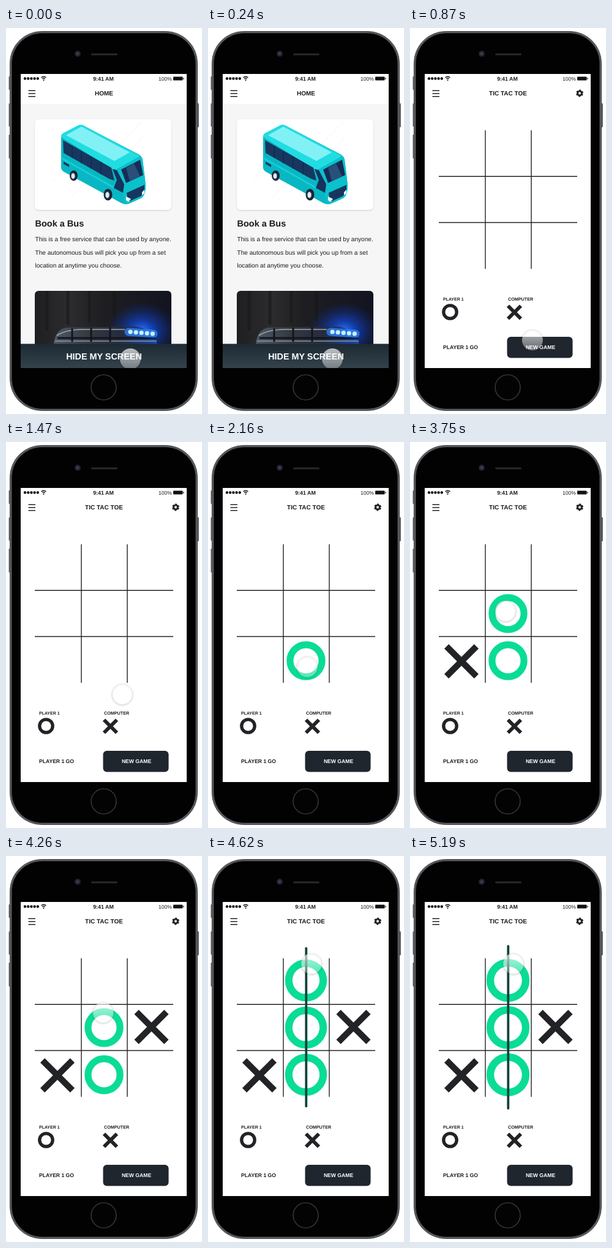
Recreate the animation shown at these times as an HTML page. Size 320 px wide and 630 px high, loop 5.22 s.

```html
<!DOCTYPE html>
<html lang="en">
<head>
<meta charset="utf-8">
<title>Tic tac toe prototype</title>
<style>
html, body { margin: 0; width: 100%; height: 100%; overflow: hidden; background: #fff }
svg { display: block; width: 320px; height: 630px }
text { font-family: "Liberation Sans", Arial, sans-serif; fill: #1c1c1e; text-rendering: geometricPrecision }
.b { font-weight: bold }
.m { text-anchor: middle }
</style>
</head>
<body>
<svg viewBox="0 0 320 630">
  <defs>
    <linearGradient id="bar" x2="0" y2="1"><stop stop-color="#1d2a34"/><stop offset="1" stop-color="#33424b"/></linearGradient>
    <linearGradient id="night" x2="1" y2="0">
      <stop stop-color="#1f1f21"/><stop offset=".25" stop-color="#2c2c2e"/><stop offset=".5" stop-color="#1e1e22"/><stop offset="1" stop-color="#121420"/>
    </linearGradient>
    <linearGradient id="lamp" x2="1" y2="0"><stop stop-color="#4d5967"/><stop offset=".35" stop-color="#34373d"/><stop offset=".65" stop-color="#252c40"/><stop offset="1" stop-color="#1646b0"/></linearGradient>
    <radialGradient id="glow"><stop stop-color="#2a78ff"/><stop offset=".35" stop-color="#1248d8" stop-opacity=".7"/><stop offset="1" stop-color="#0a2a90" stop-opacity="0"/></radialGradient>
    <linearGradient id="touch" x2="0" y2="1"><stop stop-color="#fff" stop-opacity=".7"/><stop offset="1" stop-color="#fff" stop-opacity=".3"/></linearGradient>
    <filter id="soft" x="-30%" y="-30%" width="160%" height="160%"><feGaussianBlur stdDeviation="1.2"/></filter>
    <clipPath id="screen"><path d="M24 75h271v480H24z"/></clipPath>
    <clipPath id="photo"><rect x="47" y="429" width="223" height="110" rx="6"/></clipPath>
    <circle id="ring" r="26.1" fill="none" stroke="#09dc96" stroke-width="11.2"/>
    <path id="cross" d="M-24.400-24.400L24.400 24.400M24.400-24.400L-24.400 24.400" stroke="#222326" stroke-width="10.200"/>
  </defs>

  <!-- Phone -->
  <g fill="#66686d">
    <rect x="4.500" y="79" width="4" height="22" rx="1"/><rect x="4.500" y="123" width="4" height="38" rx="1"/>
    <rect x="4.500" y="174" width="4" height="39" rx="1"/><rect x="311" y="123" width="4" height="39" rx="1"/>
  </g>
  <rect x="6.500" y="5.500" width="306" height="619" rx="52" fill="#5b5d62" stroke="#434549"/>
  <rect x="9.500" y="8.500" width="300" height="613" rx="49" fill="#020203" stroke="#28292c"/>
  <circle cx="117" cy="42" r="5" fill="#22232c"/><circle cx="117" cy="42" r="2.400" fill="#3a3d55"/>
  <rect x="139" y="41.500" width="43" height="3" rx="1.500" fill="#28292c"/>
  <circle cx="159.500" cy="586.500" r="20.500" fill="#030304" stroke="#343539" stroke-width="1.600"/>

  <g clip-path="url(#screen)">
    <path d="M24 75h271v480H24z" fill="#fff"/>

    <g id="game">
      <text class="b m" x="160" y="109.700" font-size="10">TIC TAC TOE</text>
      <g transform="translate(277 106.500) rotate(15)" fill="none" stroke="#222">
        <circle r="3.400" stroke-width="2.900"/>
        <circle r="5" stroke-width="2" stroke-dasharray="2.618"/>
      </g>
      <path d="M123 167v226M198 167v226M47 242.300h226M47 317.500h226" stroke="#222" stroke-width="1.400"/>
      <text class="b" x="54" y="445" font-size="7">PLAYER 1</text>
      <text class="b" x="160" y="445" font-size="7.200">COMPUTER</text>
      <circle cx="65.500" cy="463.500" r="10.700" fill="none" stroke="#222326" stroke-width="5.300"/>
      <path d="M160 453.500L181 474.500M181 453.500L160 474.500" stroke="#222326" stroke-width="6"/>
      <text class="b" x="54" y="524" font-size="8.600">PLAYER 1 GO</text>
      <rect x="158.500" y="504" width="107" height="34.500" rx="6" fill="#20262e"/>
      <text class="b m" x="213" y="524" font-size="8.600" style="fill:#fff">NEW GAME</text>
      <use href="#ring" id="o1"/><use href="#cross" id="x1"/>
      <use href="#ring" id="o2"/><use href="#cross" id="x2"/>
      <use href="#ring" id="o3"/>
      <path id="win" stroke="#0b4238" stroke-width="3.800" stroke-linecap="round"/>
    </g>

    <g id="home">
      <path d="M24 75h271v480H24z" fill="#fff"/>
      <path d="M24 124h271v431H24z" fill="#f6f6f6"/>
      <text class="b m" x="160" y="109.500" font-size="10">HOME</text>
      <rect x="47" y="150" width="223" height="148" rx="6" fill="#000" opacity=".16" filter="url(#soft)"/>
      <rect x="47" y="149" width="223" height="148" rx="6" fill="#fff"/>
      <path d="M75 251l25-25M105 277l32-32M184 190l37-37M202 200l20-20" stroke="#f4f4f4"/>

      <!-- Bus -->
      <g stroke-linejoin="round">
        <path d="M90 178Q90 174 93 172L118 159Q122 157 126 159L218 207Q222 210 223 214L228 256Q228 274 220 278L200 287Q194 289 187 285L95 235Q90 232 90 228Z" fill="#08b7c3"/>
        <path d="M90 178Q90 174 93 172L118 159Q122 157 126 159L219 209L181 231Q177 232 173 230Z" fill="#20dde2"/>
        <path d="M98 175L123 161L202 203L177 217Z" fill="#82f1f5"/>
        <path d="M181 230L219 209Q222 211 223 216L228 256Q228 274 220 278L200 287Q195 288 193 281Z" fill="#0bc1cc"/>
        <path d="M93 183L172 228L177 249L168 246L94 204Z" fill="#17375f"/>
        <path d="M108 192v20M123 201v20M139 210v20M155 219v20" stroke="#0e2746" stroke-width="1.200"/>
        <path d="M188 231L219 215L224 240L196 253Z" fill="#142d55"/>
        <path d="M196 228L209 221L219 242L202 250Z" fill="#28507b"/>
        <path d="M174 230L181 232L193 255L191 269L176 261L181 248Z" fill="#15335b"/>
        <path d="M91 211L176 259V262L91 214Z" fill="#16d0d5"/>
        <path d="M94 218l9 5v4l-9-5z" fill="#17365f"/>
        <path d="M197 269L226 256V270L219 275L199 284Z" fill="#17365f"/>
        <path d="M196 275l8 4-4 5-4-3zM222 268l4-4v6l-4 3z" fill="#e9ffff"/>
        <g fill="#18243a"><ellipse cx="110.500" cy="241" rx="6.500" ry="8.500"/><ellipse cx="166.500" cy="272" rx="7" ry="9.500"/></g>
        <g fill="#e4ebee" stroke="#7a8995"><ellipse cx="109.500" cy="241.500" rx="3" ry="4.500"/><ellipse cx="165.500" cy="272.500" rx="3.300" ry="5"/></g>
      </g>

      <text class="b" x="47.500" y="324.300" font-size="14.500">Book a Bus</text>
      <g font-size="10.100">
        <text x="47.500" y="348">This is a free service that can be used by anyone.</text>
        <text x="47.500" y="369.800">The autonomous bus will pick you up from a set</text>
        <text x="47.500" y="391.300">location at anytime you choose.</text>
      </g>

      <!-- Night photo -->
      <g clip-path="url(#photo)">
        <path d="M47 429h223v110H47z" fill="url(#night)"/>
        <path d="M67 429v65M101 429v55M136 429v52M177 429v50" stroke="#18181a" stroke-width="5" opacity=".6"/>
        <ellipse cx="222" cy="494" rx="58" ry="46" fill="url(#glow)"/>
        <path d="M78 516Q80 493 98 489L210 487Q240 490 247 516Z" fill="url(#lamp)"/>
        <path d="M83 502Q98 492 126 492H194" stroke="#9fa8b2" stroke-width="1.600" fill="none"/>
        <path d="M80 511H246" stroke="#8b96a6" stroke-width="1.500"/>
        <path d="M84 506H244M108 490v22M139 489v23M170 488v24" stroke="#12151c" stroke-width="3"/>
        <path d="M200 496L241 499" stroke="#2f8dff" stroke-width="13" stroke-linecap="round" opacity=".7"/>
        <path d="M203 496L240 499" stroke="#c9efff" stroke-width="7" stroke-linecap="round" stroke-dasharray=".1 9"/>
      </g>
      <path d="M24 515.500h271V555H24z" fill="url(#bar)"/>
      <text class="b m" x="160" y="541" font-size="14.400" style="fill:#fff">HIDE MY SCREEN</text>
    </g>

    <!-- Status bar and menu -->
    <g fill="#111">
      <path d="M31 82.500h23" stroke="#111" stroke-width="4.400" stroke-linecap="round" stroke-dasharray=".01 5.200"/>
      <path d="M57.500 81q4-3.600 8 0M59.300 83q2.200-2 4.400 0" fill="none" stroke="#111" stroke-width="1.300"/>
      <circle cx="61.500" cy="85" r="1.100"/>
      <text class="b m" x="159" y="85.800" font-size="8.900">9:41 AM</text>
      <text x="249" y="85.700" font-size="8.500">100%</text>
      <rect x="273" y="79.500" width="15.500" height="6" rx="1"/><rect x="289.200" y="81.200" width="1.300" height="2.600" rx=".6"/>
      <path d="M36.500 102.300h11.500M36.500 107h11.500M36.500 111.700h11.500" stroke="#222" stroke-width="1.500"/>
    </g>

    <g id="cursor">
      <circle cy="1" r="16.700" fill="none" stroke="#000" stroke-opacity=".2" stroke-width="1.400" filter="url(#soft)"/>
      <circle r="17" fill="url(#touch)" stroke="#888" stroke-opacity=".2" stroke-width=".6"/>
    </g>
  </g>
</svg>
<script>
const LOOP = 5220;
const $ = id => document.getElementById(id);
const clamp = v => Math.min(1, Math.max(0, v));
const span = (t, a, b) => clamp((t - a) / (b - a));
const smooth = p => p * p * (3 - 2 * p);
const backOut = p => 1 + 2.2 * (p - 1) ** 3 + 1.2 * (p - 1) ** 2;

// Cursor stops: time, x, y
const path = [
  [600, 203, 540], [1450, 190, 412], [1620, 189, 406], [1860, 162, 367],
  [2750, 162, 367], [3220, 156, 276], [4200, 156, 276], [4410, 169, 176]
];

function cursorAt(t) {
  const i = path.findIndex(k => k[0] > t);
  if (i === 0) return path[0].slice(1);
  if (i < 0) return path[path.length - 1].slice(1);
  const [a, ax, ay] = path[i - 1], [b, bx, by] = path[i];
  const p = smooth(span(t, a, b));
  return [ax + (bx - ax) * p, ay + (by - ay) * p];
}

// Winning marks spring from normal size to 1.11
function winScale(t) {
  const s = Math.max(0, t - 4520) / 1000;
  return 1.11 - 0.11 * Math.exp(-5.5 * s) * Math.cos(10.5 * s);
}

function mark(id, x, y, t, start, scale = 1) {
  const p = span(t, start, start + 180);
  $(id).setAttribute("transform", `translate(${x} ${y}) scale(${p ? backOut(p) * scale : 0})`);
}

function draw(now) {
  const t = now % LOOP;
  const fade = 1 - (1 - span(t, 300, 620)) ** 2;
  $("home").setAttribute("opacity", 1 - fade);

  const s = winScale(t);
  mark("o1", 160, 357, t, 1900, s);
  mark("x1", 84, 358, t, 2350);
  mark("o2", 160, 280, t, 3300, s);
  mark("x2", 237.5, 279, t, 3840);
  mark("o3", 160, 203, t, 4400, s);

  const grow = smooth(span(t, 4470, 4600));
  const half = 119.5 * s * grow;
  $("win").setAttribute("d", grow ? `M160.3 ${279.5 - half}V${279.5 + half}` : "");

  $("cursor").setAttribute("transform", `translate(${cursorAt(t)})`);
  requestAnimationFrame(() => draw(performance.now()));
}
draw(performance.now());
</script>
</body>
</html>
```
